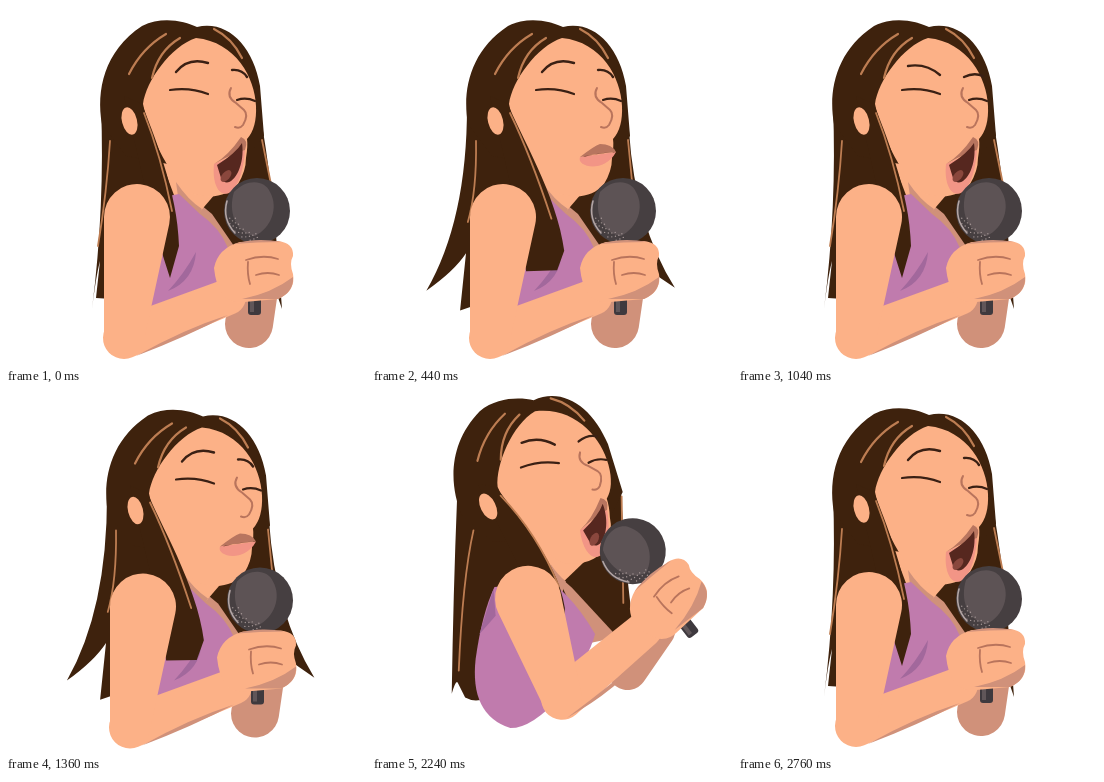
An HTML page that plays this animation: 360x360 px, repeating every 2.88 s.

```html
<!DOCTYPE html>
<html lang="en">
<head>
<meta charset="utf-8">
<title>Singer</title>
<style>
html, body { margin: 0; width: 100%; height: 100%; overflow: hidden; background: #fff; }
svg { display: block; width: 100vw; height: 100vh; }
</style>
</head>
<body>
<svg viewBox="0 0 360 360"><g id="figure"></g></svg>
<script>
const LOOP = 2880, STEP = 40;
const SKIN = '#fcb187', SHADE = '#d0917a', HAIR = '#3e220d', GLOSS = '#bd7d52';
const TOP = '#c07bad', FOLD = '#a2689c', LINE = '#b9745c', DARK = '#3a2014';
const NS = 'http://www.w3.org/2000/svg';
const figure = document.getElementById('figure');

function add(tag, attrs, parent = figure) {
  const el = document.createElementNS(NS, tag);
  for (const k in attrs) el.setAttribute(k, attrs[k]);
  return parent.appendChild(el);
}
const group = () => add('g', {});
const fill = (color, parent, d = '') => add('path', { fill: color, d }, parent);
const line = (color, width, parent, d = '') => add('path', {
  fill: 'none', stroke: color, 'stroke-width': width, 'stroke-linecap': 'round', d
}, parent);

// layers, back to front
const backHair = fill(HAIR);
const backGloss = line(GLOSS, 1.8);
const chest = fill(SHADE);
const neck = fill(SKIN);
const neckShade = fill(SHADE);
const blouse = fill(TOP);
const folds = fill(FOLD);

const head = group();
fill(HAIR, head, 'M96 118C90 85 98 45 136 20C156 10 178 15 191 21C222 14 247 40 254 80L258 130L225 170L120 150Z');
fill(SKIN, head, 'M190 32C165 40 140 75 137 98C142 122 160 168 185 187C205 194 222 190 232 178Q240 165 240 152Q242 140 241 133Q251 122 250 100C249 72 230 36 190 32Z');
const brows = line(DARK, 2.4, head);
line(DARK, 2.2, head, 'M164 84Q184 81 202 88M231 94Q240 91 249 95');
line(LINE, 2, head, 'M225 82Q220 91 230 97L238 104Q243 109 237 119Q234 123 229 121');
const lowerLip = fill('#f29586', head);
const upperLip = fill('#b8755f', head);
const hole = fill('#56271f', head);
const tongue = add('ellipse', { fill: '#8a473d', transform: 'translate(220 170) rotate(-50)' }, head);

const strand = fill(HAIR);
const strandGloss = line(GLOSS, 1.8);
const crown = group();
line(GLOSS, 2.2, crown, 'M123 68Q136 42 160 28M146 72Q152 45 174 32M208 23Q226 32 236 52');
add('ellipse', { rx: 7.5, ry: 14, fill: SKIN, transform: 'translate(123.5 115) rotate(-14)' }, crown);

const backArm = fill(SHADE);
const foreArm = fill(SKIN);
const upperArm = fill(SKIN);
const armShade = fill(SHADE);

const grip = group();
const mic = add('g', { transform: 'translate(251 205)' }, grip);
add('rect', { x: -9, y: 20, width: 13, height: 84, rx: 3, fill: '#3e393e' }, mic);
add('rect', { x: -7, y: 30, width: 4, height: 71, fill: '#605659' }, mic);
add('circle', { r: 33, fill: '#463f41' }, mic);
fill('#5d5355', mic, 'M-23-19C-10-33 8-31 13-19C22-3 14 17-2 25C-22 22-29 0-23-19Z');
line('#b3a5a4', 1.6, mic, 'M-30-10Q-35 8-22 22');
for (let i = 0; i < 24; i++) {
  const a = 1.5 + i * .06, r = 30 - (i * 7 % 5) * 1.8;
  add('circle', { cx: Math.cos(a) * r, cy: Math.sin(a) * r, r: .7, fill: '#a59796' }, mic);
}
fill(SKIN, grip, 'M208 262Q212 242 234 236L272 235Q288 237 287 250Q283 257 287 268Q290 285 272 293L238 296Q212 300 208 262Z');
fill(SHADE, grip, 'M236 293Q266 287 287 271Q288 286 272 293ZM228 238Q250 231 276 236Q250 236 228 238Z');
line(LINE, 1.8, grip, 'M240 254Q257 248 272 253M250 269Q262 265 273 269M242 256Q241 268 244 278');

// motion: a rise from a to b, a hold, a fall from c to d
function ease(x) {
  x = Math.max(0, Math.min(1, x));
  return x * x * (3 - 2 * x);
}
const pulse = (t, a, b, c, d) => ease((t - a) / (b - a)) - ease((t - c) / (d - c));

// outline of a limb that tapers from one round joint to another
function limb([x1, y1], r1, [x2, y2], r2) {
  const dir = Math.atan2(y2 - y1, x2 - x1);
  const side = Math.acos((r1 - r2) / Math.hypot(x2 - x1, y2 - y1));
  const rim = (x, y, r, a) => `${x + r * Math.cos(a)} ${y + r * Math.sin(a)}`;
  return `M${rim(x1, y1, r1, dir + side)}A${r1} ${r1} 0 1 1 ${rim(x1, y1, r1, dir - side)}` +
    `L${rim(x2, y2, r2, dir - side)}A${r2} ${r2} 0 0 1 ${rim(x2, y2, r2, dir + side)}Z`;
}

function draw(t) {
  const flare = pulse(t, 0, 500, 540, 1000) + 1.1 * pulse(t, 1080, 1240, 1260, 1680);
  const shut = pulse(t, 160, 340, 620, 800) + pulse(t, 1120, 1240, 1400, 1560);
  const lean = 1.06 * pulse(t, 1400, 1800, 2200, 2760);
  const shift = pulse(t, 1080, 1340, 1600, 1800);
  const mad = Math.min(1, pulse(t, 640, 900, 1100, 1280) + lean);

  // p: body point moved by lean and flare; h: point fixed to the head
  const p = (x, y, lx = 0, ly = 0, fx = 0, fy = 0) => [x + lx * lean + fx * flare, y + ly * lean + fy * flare];
  const tilt = -12 * lean, ear = p(122, 115, -7, -2);
  const cos = Math.cos(tilt * Math.PI / 180), sin = Math.sin(tilt * Math.PI / 180);
  const h = (x, y) => [ear[0] + (x - 122) * cos - (y - 115) * sin, ear[1] + (x - 122) * sin + (y - 115) * cos];
  const set = (el, d) => el.setAttribute('d', d);
  const pose = (el, s) => el.setAttribute('transform', s);

  pose(figure, `translate(${6 * shift} ${1.5 * shift})`);
  for (const g of [head, crown]) pose(g, `translate(${ear}) rotate(${tilt}) translate(-122 -115)`);
  pose(grip, `translate(${p(248 - 3 * shift, 265, 45, -56)}) rotate(${-36 * lean}) translate(-248 -265)`);

  // hair
  set(backHair, `M${h(95, 100)}Q${p(99, 200, -17, 0, -4, 15)} ${p(86, 303, -6, -3, -33, -19)}` +
    `Q${p(90, 270, -6, 15, -8, -5)} ${p(94, 255, -8, 32, 0, -8)}L${p(90, 292, 3, 11, -2, 13)}` +
    `Q${p(120, 295, -5, 20)} ${p(150, 275)}L${p(215, 240)}L${p(262, 262, -12, -12, 12, 0)}` +
    `L${p(276, 303, -14, -70, 28, -22)}Q${p(268, 190, -13, 0, -5, 30)} ${h(257, 125)}Z`);
  set(backGloss, `M${h(104, 135)}Q${p(101, 185, -10, 0, 4, 0)} ${p(92, 240, -5, 35, 4, -25)}` +
    `M${h(256, 134)}L${p(267, 188, -15, 20, -6, 0)}`);
  set(strand, `M${h(118, 90)}L${h(136, 98)}C${h(146, 125)} ${p(172, 185, 13, -20, 14, 5)} ${p(173, 240, 19, -25, 20, 5)}` +
    `L${p(164, 272, 26, -30, 22, -8)}L${p(157, 250, 25, -28, -3, 16)}L${p(140, 185, 10, -5)}Z`);
  set(strandGloss, `M${h(138, 107)}Q${p(155, 150, 10, -10, 4, 0)} ${p(166, 205, 20, -12, 14, 8)}`);

  // neck and top
  set(chest, `M${p(172, 180, 12, 0)}L${p(206, 208, -6, -14)}L${p(228, 240, 17, 3)}L${p(200, 260, 15, -10)}Z`);
  set(neck, `M${h(146, 130)}L${h(210, 187)}L${p(192, 208, -2, -18)}L${p(172, 200, 0, -20)}Z`);
  set(neckShade, `M${p(170, 176, 8, -6)}Q${p(182, 194, 4, -12)} ${p(196, 203, -2, -15)}L${p(188, 216, 2, -16)}L${p(174, 205, 8, -10)}Z`);
  set(blouse, `M${p(173, 188, 7, 0)}L${p(194, 208, -1, -8)}Q${p(214, 222, -4, -5)} ${p(222, 242, 1, -2)}` +
    `Q${p(214, 272, 3, -8)} ${p(206, 291, -16, 10)}Q${p(160, 306, 0, 27)} ${p(130, 308, 8, 25)}` +
    `Q${p(110, 300, -12, 20)} ${p(112, 265, -8, 0)}Q${p(115, 220, -5, 0)} ${p(135, 195, -12, -2)}Z`);
  set(folds, `M${p(190, 246, -10, -6)}Q${p(188, 275, -2, -14)} ${p(162, 285, 14, -18)}Q${p(178, 268, 2, -10)} ${p(190, 246, -10, -6)}Z` +
    `M${p(132, 200, -10, -5)}L${p(122, 235, -14, 5)}L${p(132, 225, -8, -3)}Z`);

  // arms
  const elbow = p(118, 332, 69, -26);
  set(backArm, limb(p(243, 318, 12, -40), 24 - 4 * lean, p(253, 284, 30, -46), 19));
  set(foreArm, limb(elbow, 21, p(222, 291, 48, -53), 18));
  set(upperArm, limb(p(131, 211, 24, -6), 33, elbow, 20));
  set(armShade, `M${p(130, 350, 62, -25)}Q${p(178, 323, 62, -33)} ${p(222, 309, 53, -50)}Q${p(180, 331, 62, -33)} ${p(130, 350, 62, -25)}Z`);

  // face
  const b = (from, to) => from + (to - from) * mad;
  set(brows, `M170 ${b(66, 60)}Q${b(182, 188)} ${b(51, 57)} 202 ${b(57, 69)}` +
    `M226 ${b(64, 71)}Q236 ${b(63, 66)} ${b(241, 245)} ${b(71, 70)}`);
  const m = (open, closed) => open + (closed - open) * shut;
  const left = `208 ${m(158, 151)}`;
  const right = `${m(239, 244)} ${m(144, 146)}`;
  set(lowerLip, `M${left}C204 ${m(198, 161)} ${m(235, 232)} ${m(202, 168)} ${right}Z`);
  set(upperLip, `M${left}Q222 ${m(150, 140)} ${m(235, 228)} ${m(131, 138)}Q${m(243, 240)} ${m(134, 138)} ${right}Q226 ${m(148, 147)} ${left}Z`);
  set(hole, `M211 ${m(159, 151)}Q${m(230, 226)} ${m(147, 147)} ${m(236, 240)} ${m(137, 146)}` +
    `C${m(240, 230)} ${m(165, 147)} ${m(222, 222)} ${m(186, 149)} ${m(215, 213)} ${m(172, 150)}Z`);
  tongue.setAttribute('rx', m(7, 0));
  tongue.setAttribute('ry', m(4, 0));
}

const start = performance.now();
function tick() {
  const t = (performance.now() - start) % LOOP;
  draw(Math.floor(t / STEP) * STEP);
  requestAnimationFrame(tick);
}
tick();
</script>
</body>
</html>
```
